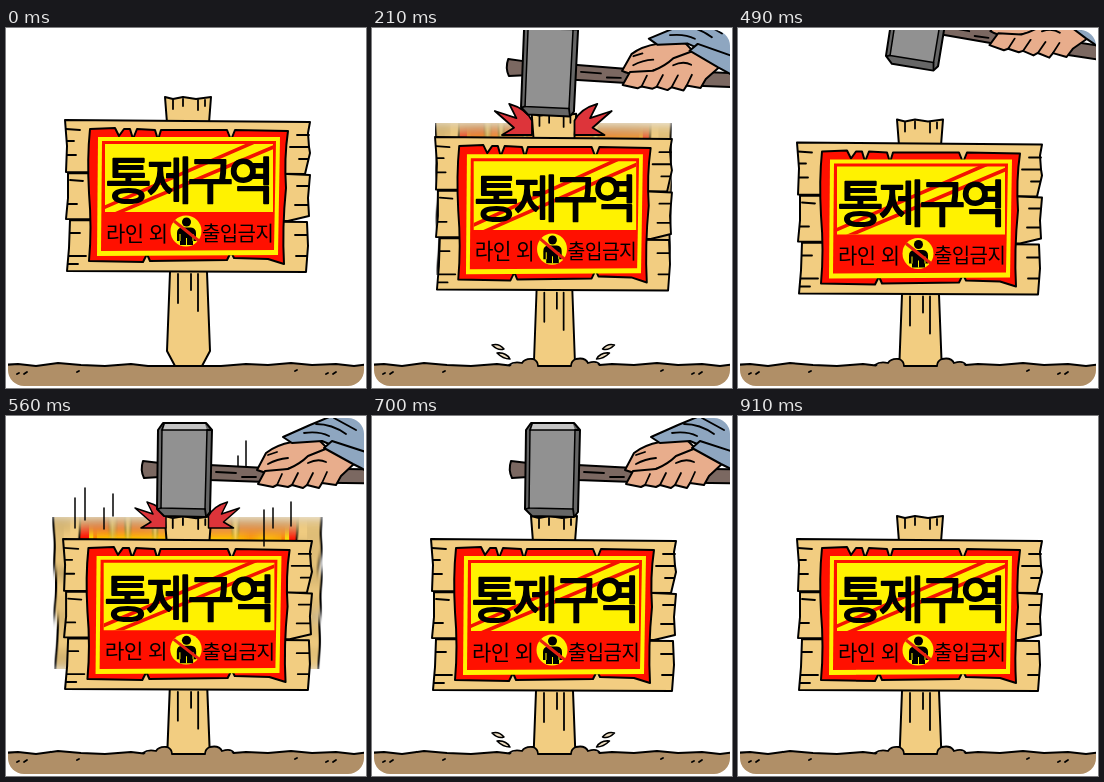
Recreate the animation shown at these times as an HTML page. Size 360x360 px, loop 1.4 s.

```html
<!DOCTYPE html>
<html lang="ko">
<head>
<meta charset="utf-8">
<style>
  html, body { margin: 0; height: 100%; overflow: hidden; background: #fff; }
  svg { display: block; width: 100vw; height: 100vh; }
  .line { fill: none; stroke: #000; stroke-width: 1.8; stroke-linecap: round; stroke-linejoin: round; }
  .shape { stroke: #000; stroke-width: 2; stroke-linejoin: round; }
  .thin { stroke-width: 1.5; }
  .wood { fill: #f2cd81; }
  .soil { fill: #b08f67; }
  .red { fill: #ff1000; }
  .yellow { fill: #fff200; }
  .skin { fill: #e8ad8c; }
  .sleeve { fill: #8ea6c0; }
  .handle { fill: #7b6861; }
  text { font-family: "Noto Sans CJK KR", "Noto Sans CJK", sans-serif; font-weight: 500; }
  .title { font-size: 50px; letter-spacing: -5px; stroke: #000; stroke-width: 1.8; stroke-linejoin: round; }
</style>
</head>
<body>
<svg viewBox="0 0 360 360">
  <defs>
    <clipPath id="stage"><rect x="2" y="2" width="356" height="356" rx="16"/></clipPath>
    <clipPath id="panel"><rect x="99" y="114" width="168" height="70"/></clipPath>
    <filter id="smear" x="0" y="0" width="100%" height="100%"><feGaussianBlur stdDeviation="0 6"/></filter>
    <path id="burst" class="shape thin" fill="#dd343a"
      d="M129 84 L147 90 L141 78 Q155 82 160 92 L160 104 H135 L145 98 Z"/>
    <path id="chips" class="shape thin" fill="#9b7b50"
      d="M122 311 L126 309 L144 323 L140 326 Z M139 307 L143 306 L145 310 L141 311 Z M139 318 L142 317 L143 320 Z M126 331 L134 333 L128 334 Z"/>
    <path id="dust" class="shape thin" fill="#ecdcc0"
      d="M120 317 Q127 315 132 321 Q126 323 120 317 Z M125 325 Q134 324 138 331 Q131 331 125 325 Z"/>
  </defs>
  <g clip-path="url(#stage)">
    <g id="ghost"><use href="#board" filter="url(#smear)"/></g>

    <g id="sign">
      <path class="shape wood" d="M159 69 L167 71 L177 69 L190 71 L205 69 L203 95 L201 244 L204 323 L196 338 L169 338 L161 323 L164 244 L161 95 Z"/>
      <path class="line" d="M167 72V81 M177 71V78 M192 72V82 M199 72V78 M172 246V275 M185 246V262 M192 246V283"/>
      <g id="board">
        <path class="shape wood" d="M59 92 L304 94 L302 105 L303 119 L304 125 L299 146 L60 144 L61 118 Z"/>
        <path class="shape wood" d="M64 192 L301 194 L302 218 L300 244 L61 243 L63 220 Z"/>
        <path class="shape wood" d="M62 145 L281 146 L304 147 L302 170 L303 188 L282 193 L60 191 L62 170 Z"/>
        <path class="line" d="M60 101 L74 102 M61 113H68 M61 127H70 M64 152 L77 153 M62 176H71 M64 205H74 M63 228H80 M62 236H72
          M303 107H291 M303 119H284 M302 131H293 M302 158H291 M302 177H289 M301 207H289 M301 228H290"/>
        <path class="shape red" d="M84 101 L109 100 L113 108 L118 101 L124 101 L127 111 L131 101 L149 102 L152 112 L155 102 L221 102 L225 112 L229 102 L282 103
          Q278 130 280 160 Q276 200 278 236 L262 231 L228 230 L225 224 L221 232 L144 233 L141 226 L137 234 L83 233 Q86 200 83 165 Q81 130 84 101 Z"/>
        <path class="yellow" d="M92 109 L274 109 L272 227 L91 228 Z"/>
        <path class="red" d="M96 113 H270 L268 222 L95 223 Z"/>
        <path class="yellow" d="M99 116 H267 V184 H99 Z"/>
        <path d="M97 180 L253 112 M109 186 L270 118" stroke="#f31300" stroke-width="3.6" clip-path="url(#panel)"/>
      </g>
      <text class="title" x="99.5" y="171">통제구역</text>
      <text x="100" y="212.5" font-size="21" letter-spacing="-.6">라인 외</text>
      <text x="196" y="212.5" font-size="20" letter-spacing="-.6">출입금지</text>
      <circle class="yellow" cx="180" cy="203" r="15.5"/>
      <circle cx="180.5" cy="194" r="4.5"/>
      <path d="M176 199.500 H185 Q190 200 190 205 V213 H187 V217 H174 V213 H171 V205 Q171 200 176 199.500 Z"/>
      <path class="yellow" d="M173.500 206 H174.500 V213 H173.500 Z M186.500 206 H187.500 V213 H186.500 Z M180 210 H181 V217 H180 Z"/>
      <path d="M168 193 L193 213" stroke="#e92010" stroke-width="3"/>
    </g>

    <path class="shape soil" d="M-4 364 V337 L12 336 L30 338 L52 335 L75 337 L99 338 L125 336 L142 338 L190 338 L215 338 L240 336 L262 337 L285 335 L306 337 L330 336 L348 338 L364 336 V364 Z"/>
    <path class="line" d="M11 346 L13 345 M18 346 L21 344 M71 344 L73 343 M320 346 L322 345 M327 346 L330 344 M289 343 L291 342"/>
    <g id="mounds">
      <path class="soil" d="M137 340 Q142 333 150 335 Q153 330 161 331 Q166 333 166 340 H199 Q199 333 204 331 Q213 329 216 335 Q225 332 228 340 Z"/>
      <path class="line" d="M137 337 Q142 333 150 335 Q153 330 161 331 Q166 333 166 338 M199 338 Q199 333 204 331 Q213 329 216 335 Q225 332 228 337"/>
    </g>
    <g id="debris"></g>
    <path id="streaks" class="line thin"/>
    <g id="bursts"></g>

    <g id="hammer">
      <path class="shape handle" d="M139 45 L156 47 V61 L140 62 Q136 54 139 45 Z"/>
      <path class="shape handle" d="M205 49 L262 52 L430 54 V68 L262 66 L205 64 Z"/>
      <path class="line" d="M212 56 L232 57 M238 61 L252 61"/>
      <path class="shape" fill="#666" d="M159 7 H202 L208 14 L206 96 L202 101 L160 100 L153 93 L154 14 Z"/>
      <path fill="#c4c4c4" d="M160 8 H201 L203 14 H158 Z"/>
      <path class="shape thin" fill="#919191" d="M158 14 H203 L201 93 L157 92 Z"/>
      <path class="line" d="M158 14 L160 8 M203 14 H207 M201 93 L202 100 M157 92 L154 93"/>

      <path class="shape skin" d="M253 54 L262 37 Q272 29 288 26 L308 17 L324 33 L298 48 L278 55 Q264 59 253 54 Z"/>
      <path class="line" d="M264 48 Q273 43 284 42 M264 39 L273 36"/>
      <path class="shape sleeve" d="M288 27 L279 21 L306 9 L330 -1 L430 -60 V60 L354 40 L318 25 Z"/>
      <path class="line" d="M300 17 Q315 15 325 20 M312 8 Q328 8 342 18 M330 2 L352 14"/>
      <path class="shape skin" d="M254 68 L261 55 L284 53 Q296 48 304 40 L324 32 L352 46 L337 60 L332 69 L318 67 L315 72 L303 69 L299 72 L288 69 L284 71 L273 69 L269 71 Z"/>
      <path class="line" d="M273 69 L278 58 M288 69 L294 57 M303 69 L309 57 M318 67 L323 56 M304 47 Q314 42 322 46"/>
      <path class="shape sleeve" d="M320 32 L328 25 L362 36 L430 50 V90 L357 52 L349 48 Z"/>
    </g>
  </g>
</svg>
<script>
const STEP = 70, LOOP = 1400;
const $ = id => document.getElementById(id);

const lines = (y, list) => list.map(([x, a, b]) => `M${x} ${a + y}V${b + y}`).join('');
const hitLines = [[69, 78, 112], [79, 70, 98], [96, 65, 108], [107, 92, 112], [256, 8, 22], [268, 10, 24],
  [258, 66, 110], [272, 68, 92], [285, 83, 108], [292, 78, 104]];
const dropLines = [[69, 82, 112], [79, 72, 104], [98, 92, 113], [107, 78, 100], [232, 40, 51], [240, 25, 55],
  [258, 94, 130], [267, 92, 112], [285, 86, 110]];

// y, sx, sy: sign offset and squash; hammer: x, y, tilt; ghost: y, sx; burst: scale, y
const rest = [0, 0, 0], lifted = [0, -61, 8];
const poses = [
  { y: 0 },
  { y: 18, sx: 1.016, hammer: [-2, -12, 0], ghost: [-4, 1.11], burst: [1, -4], streaks: lines(-12, dropLines), debris: '' },
  { y: 20, sx: 1.03, sy: 1.01, hammer: [0, -8, -1.5], ghost: [4, 1.11], burst: [1, 0], streaks: lines(0, hitLines), debris: 'chips' },
  { y: 17, sx: .967, sy: 1.01, hammer: [-3, -13, 1.5], ghost: [3, .967], burst: [1.2, 3], debris: 'dust' },
  { y: 23, hammer: [0, -8, 0], debris: 'dust' },
  { y: 22.5, hammer: lifted },
  { y: 22.5 },
  { y: 22.5, hammer: lifted },
  { y: 31, sx: 1.016, sy: .993, hammer: [-2, 0, 0], ghost: [9, 1.1], burst: [1, 8], streaks: lines(0, dropLines) },
  { y: 27, sx: .975, sy: 1.01, hammer: [-2, -5, 1.5], ghost: [13, .975], burst: [1.2, 11], debris: 'chips' },
  { y: 31, hammer: rest, debris: 'dust' },
  { y: 31, hammer: rest },
  { y: 31, hammer: lifted },
  { y: 31 }
];

const both = (id, scale = 1, y = 0) => ['', 'translate(362.5 0) scale(-1 1) '].map(mirror =>
  `<use href="#${id}" transform="${mirror}translate(160 ${104 + y}) scale(${scale}) translate(-160 -104)"/>`).join('');

const place = (id, y, sx, sy = 1) =>
  $(id).setAttribute('transform', `translate(181 ${92 + y}) scale(${sx} ${sy}) translate(-181 -92)`);

const show = (id, on) => $(id).style.display = on ? '' : 'none';

function draw(i) {
  const { y, sx = 1, sy = 1, hammer, burst, debris, streaks = '', ghost } = poses[i];
  place('sign', y, sx, sy);
  show('mounds', i > 0);
  show('hammer', hammer);
  show('ghost', ghost);
  if (hammer) {
    const [hx, hy, tilt] = hammer;
    $('hammer').setAttribute('transform', `translate(${hx} ${hy}) rotate(${tilt} 180 55)`);
  }
  if (ghost) place('ghost', ...ghost);
  $('bursts').innerHTML = burst ? both('burst', ...burst) : '';
  $('debris').innerHTML = debris ? both(debris) : '';
  $('streaks').setAttribute('d', streaks);
}

let shown = -1;
function tick() {
  const i = Math.min(poses.length - 1, Math.floor(performance.now() % LOOP / STEP));
  if (i !== shown) draw(shown = i);
  requestAnimationFrame(tick);
}
tick();
</script>
</body>
</html>
```
